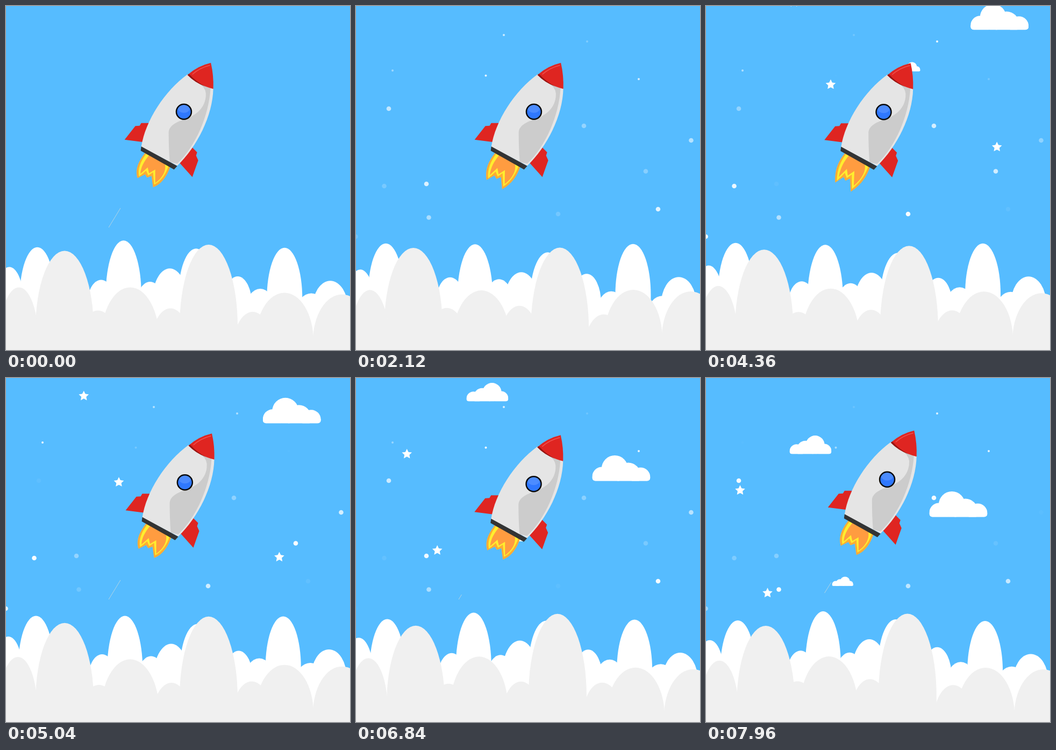
Recreate the animation shown at these times as an HTML page with a canvas. Size 640x640 px, loop 8 s.

```html
<!DOCTYPE html>
<html lang="en">
<head>
<meta charset="utf-8">
<title>Rocket</title>
<style>
html, body { margin: 0; width: 100%; height: 100%; overflow: hidden; background: #56bcff; }
canvas { display: block; width: 100vw; height: 100vh; }
</style>
</head>
<body>
<canvas id="stage" width="640" height="640"></canvas>
<script>
const ctx = document.getElementById('stage').getContext('2d');
const LOOP = 8000, STEP = 112, TAU = Math.PI * 2;
const SKY = '#56bcff', WHITE = '#fff', MIST = '#f0f0f0', RED = '#df2521';

// Listed in the order in which they light up
const dots = [
  [52.5, 335], [539, 307.5], [68, 120], [623.5, 250], [275, 54],
  [131, 331], [241.5, 129.5], [562, 378], [526, 136], [61, 191],
  [135.5, 393.5], [424, 223], [430, 66], [376, 387], [-.5, 429]
];

// Each falls in from the top edge: x there, time there, speed, sideways slope, scale
const stars = [[299.5, 2308, 70.8], [662.5, 1883, 105.4], [160, 4493, 60.3]];
const clouds = [[562, 3630, 59.8, .358, 1], [266.5, 6337, 87.5, .51, -.72], [436, 2726, 74, .47, -.365]];

// Tops of the puffs: tall ones and the low ones between them
const back = {
  color: WHITE, floor: 560, lag: .6, tallWidth: 33, lowWidth: 27,
  tall: [[57, 445.5], [220, 439.5], [306, 491.5], [355, 454.5], [517, 446.5], [602, 508]],
  low: [[6, 485.5], [177, 509.5], [268, 513], [431, 503], [473, 526], [568, 534.5]]
};
const front = {
  color: MIST, floor: 640, lag: 0, tallWidth: 54, lowWidth: 36,
  tall: [[109, 455.5], [231, 523.5], [377, 444], [518, 533.5], [625, 536.5]],
  low: [[24, 523.5], [171, 566.5], [306, 562.5], [459, 569]]
};

function fill(path, color) {
  ctx.fillStyle = color;
  ctx.fill(new Path2D(path));
}

function disc(x, y, r) {
  ctx.beginPath();
  ctx.arc(x, y, r, 0, TAU);
  ctx.fill();
}

function drawDots(t) {
  const period = 4700;
  ctx.fillStyle = WHITE;
  dots.forEach(([x, y], i) => {
    const glow = Math.cos((t / period - (i + .5) / dots.length) * TAU);
    ctx.globalAlpha = Math.max(0, .5 * Math.min(1, t / 1000) + .48 * glow * Math.min(1, t / 3000));
    disc(x, y, y < 150 ? 2 : 4.3);
  });
  ctx.globalAlpha = 1;
}

function fall([x, t0, speed, slope = .463], t) {
  const y = speed * (t - t0) / 1000;
  return [x - slope * y, y];
}

function drawStar(x, y) {
  ctx.beginPath();
  for (let i = 0; i < 10; i++) {
    const r = i % 2 ? 4.8 : 9.8, a = i * TAU / 10 - TAU / 4;
    ctx.lineTo(x + r * Math.cos(a), y + .5 + r * Math.sin(a));
  }
  ctx.fill();
}

// x, y is the middle of the flat base; a negative scale mirrors
function drawCloud(x, y, scale) {
  ctx.save();
  ctx.translate(x, y);
  ctx.scale(scale, Math.abs(scale));
  ctx.beginPath();
  ctx.roundRect(-54, -48, 108, 48, [0, 0, 6, 6]);
  ctx.clip();
  disc(-36, -8, 18);
  disc(-12, -23, 24.5);
  disc(13, -11, 23);
  disc(36, -7, 18);
  ctx.fillRect(-54, -8, 108, 8);
  ctx.restore();
}

function drawPuff(x, top, width, height) {
  ctx.beginPath();
  ctx.ellipse(x, top + height, width, height, 0, Math.PI, TAU);
  ctx.lineTo(x + width, 650);
  ctx.lineTo(x - width, 650);
  ctx.fill();
}

// The middle of the bank rises while its sides sink; low puffs go against the tall ones
function drawBank({ color, floor, lag, tallWidth, lowWidth, tall, low }, t) {
  const rock = (puffs, width, swing) => {
    for (const [x, top] of puffs) {
      const dy = -swing * Math.sign(Math.cos(x / 600 * TAU));
      drawPuff(x + .4 * dy, top + dy, width, 15 + .7 * (floor - top));
    }
  };
  ctx.fillStyle = color;
  rock(tall, tallWidth, 5.7 * Math.sin(t / 10000 * TAU - lag));
  rock(low, lowWidth, -5 * Math.sin(t / 7400 * TAU));
}

// A streak shrinks towards its lower end, then waits for its next turn
function drawStreak(x, y, dx, dy, age) {
  const left = 1 - .75 * age;
  if (left <= 0) return;
  ctx.strokeStyle = 'rgba(225,225,215,.65)';
  ctx.lineWidth = 1;
  ctx.beginPath();
  ctx.moveTo(x + dx * left, y + dy * left);
  ctx.lineTo(x, y);
  ctx.stroke();
}

function drawFlame(n) {
  const reach = Math.max(0, Math.cos((n - 51) * .0692 * TAU));
  const tip = (x, y, k = 1) => `${x - 8 * reach * k} ${y + 16 * reach * k}`;
  fill(`M258 274C246 290 239 304 ${tip(244, 321)}L${tip(258, 314, .6)}L${tip(262, 320, .7)}
    L${tip(270, 317, .6)}L${tip(273, 338)}C290 332 300 315 305 299Z`, '#fdad35');
  fill(`M260 276C250 290 244 303 ${tip(247, 318)}L${tip(260, 307, .5)}L${tip(264, 316, .6)}
    L${tip(273, 310, .5)}L${tip(275, 333)}C289 326 297 312 302 298Z`, '#ffee2e');
  fill(`M266 278C256 290 250 301 ${tip(249.5, 313, .7)}L${tip(263, 301, .3)}L${tip(265.5, 312, .5)}
    L${tip(277, 305, .3)}L${tip(277, 330, .6)}C291 321 298 306 295 295Z`, '#ff9c40');
}

function drawRocket(n) {
  const bob = .5 - .5 * Math.cos((.358 * n + .098) * TAU);
  ctx.save();
  ctx.translate(6.8 * bob, -8.8 * bob);
  drawFlame(n);
  fill('M265 218.5L251 218.5L248 223.5L240 224L220 249.5L255 254ZM346 264L355 273L353 279L357 288L346 319L320 290Z', RED);
  fill('M251 263C258 215 295 158 337 128L385 154C384 205 355 262 318 298Z', '#e5e5e5');
  fill('M362 147Q373 156 371 170C368 195 348 206 330 212Q303 221 302 235Q302 265 304 291L318 294C352 262 377 205 380 153Z', '#ccc');
  fill('M251 262L250 270L312 305L318 298.5Z', '#333');
  fill('M337 129Q356 112 380.5 106.5Q386 130 385 155Q357 148 337 129Z', RED);
  fill('M337 129L340 127Q352 141 371 151Q350 143 337 129Z', '#981512');
  ctx.strokeStyle = '#f0524e';
  ctx.lineWidth = 1.5;
  ctx.stroke(new Path2D('M346 128Q359 116 379 111'));
  ctx.fillStyle = '#2f78ff';
  disc(330.3, 197.5, 14);
  ctx.fillStyle = '#4c8cff';
  ctx.beginPath();
  ctx.ellipse(330.3, 192, 11, 7.5, 0, 0, TAU);
  ctx.fill();
  ctx.strokeStyle = '#0a0a0a';
  ctx.lineWidth = 2.5;
  ctx.beginPath();
  ctx.arc(330.3, 197.5, 14, 0, TAU);
  ctx.stroke();
  ctx.restore();
}

function draw(now) {
  // The picture advances in even steps
  const n = Math.floor((now % LOOP + 8) / STEP), t = n * STEP;
  ctx.fillStyle = SKY;
  ctx.fillRect(0, 0, 640, 640);
  drawDots(t);
  for (const star of stars) drawStar(...fall(star, t));
  for (const cloud of clouds) drawCloud(...fall(cloud, t), cloud[4]);
  drawStreak(191, 412, 22, -36, n % 15);
  drawStreak(220.5, 400, 12.5, -20, (n + 9) % 20);
  drawRocket(n);
  drawBank(back, t);
  drawBank(front, t);
}

let start;
function tick(now) {
  start ??= now;
  draw(now - start);
  requestAnimationFrame(tick);
}
draw(0);
requestAnimationFrame(tick);
</script>
</body>
</html>
```
